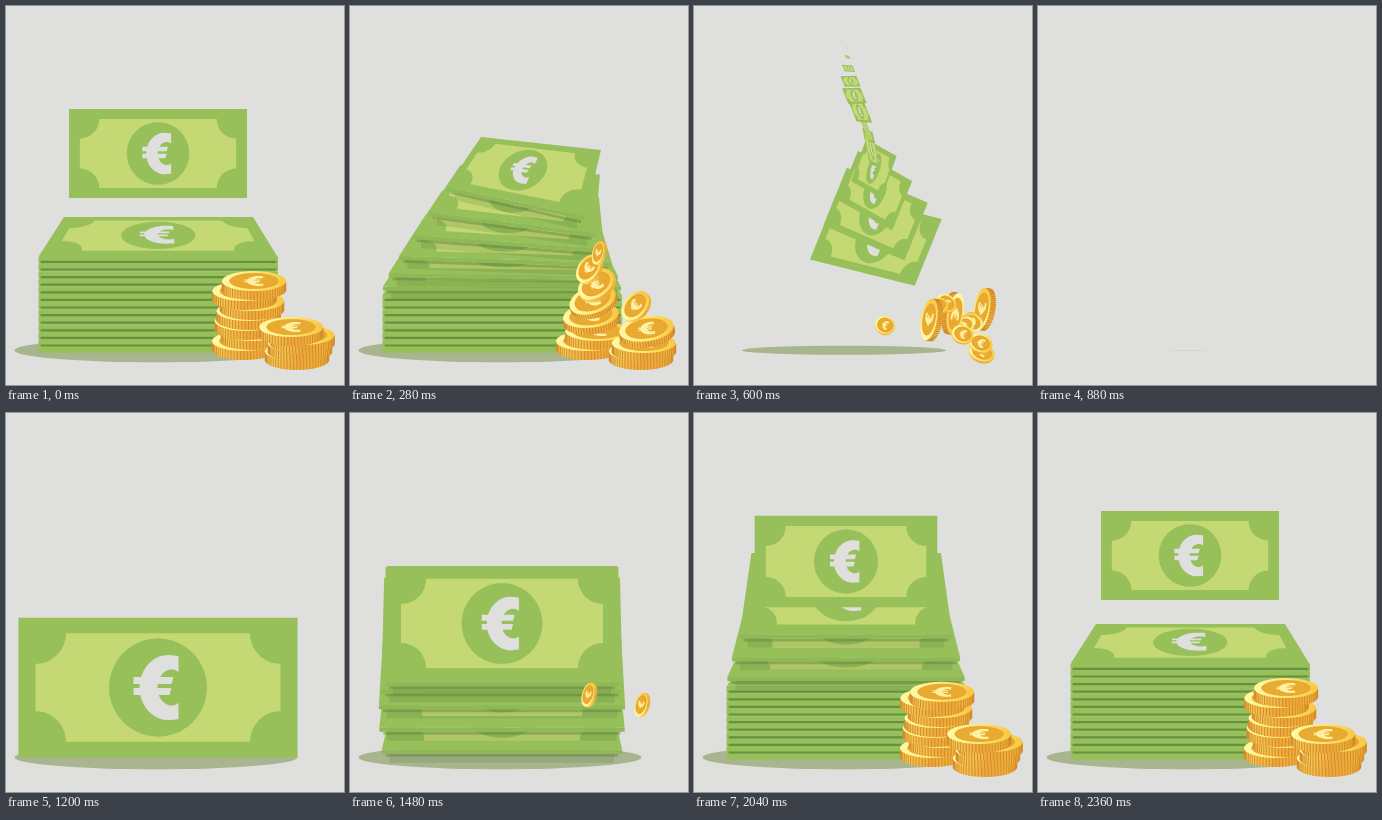
An HTML page that plays this animation: 338 by 379 pixels, repeating every 2.44 s.

```html
<!DOCTYPE html>
<html lang="en">
<head>
<meta charset="utf-8">
<title>Money pile</title>
<style>
html, body { margin: 0; width: 100%; height: 100%; overflow: hidden; background: #dfdfdd; }
svg { display: block; width: 338px; height: 379px; }
</style>
</head>
<body>
<svg viewBox="0 0 338 379" width="338" height="379">
  <defs>
    <linearGradient id="rim"><stop offset="0" stop-color="#fff9a6"/><stop offset=".5" stop-color="#ffe970"/><stop offset="1" stop-color="#f8c740"/></linearGradient>
    <linearGradient id="side"><stop offset="0" stop-color="#fbd75c"/><stop offset=".5" stop-color="#eda93a"/><stop offset="1" stop-color="#f3b63c"/></linearGradient>
  </defs>
  <g id="stage"></g>
</svg>
<script>
const LOOP = 2440, STEP = 40, LAYERS = 13, GAP = 7.6;
const BG = '#dfdfdd', GREEN = '#97c05b', LIGHT = '#c4d973';
const { PI, sin, cos, tanh, exp, abs } = Math;
const stage = document.getElementById('stage');

const clamp = v => Math.max(0, Math.min(1, v));
const span = (t, a, b) => clamp((t - a) / (b - a));
const smooth = v => v * v * (3 - 2 * v);
const rad = deg => deg * PI / 180;
const mix = (a, b, p) => a + (b - a) * p;
const mixAll = (a, b, p) => a.map((v, i) => Array.isArray(v) ? mixAll(v, b[i], p) : mix(v, b[i], p));
const path = pts => 'M' + pts.map(p => p[0].toFixed(2) + ' ' + p[1].toFixed(2)).join('L') + 'Z';
const fill = (d, color, extra = '') => `<path d="${d}" fill="${color}" ${extra}/>`;

// Points on an ellipse between two angles in degrees
function arc(cx, cy, rx, ry, from, to, n = 20) {
  return Array.from({ length: n + 1 }, (_, i) => {
    const a = rad(mix(from, to, i / n));
    return [cx + rx * cos(a), cy + ry * sin(a)];
  });
}

// Banknote artwork on a 279 x 139 sheet
const W = 279, H = 139, MX = 17, MY = 15.5, R = 30.5;
const inner = [
  ...arc(MX, MY, R, R, 90, 0, 10),
  ...arc(W - MX, MY, R, R, 180, 90, 10),
  ...arc(W - MX, H - MY, R, R, 270, 180, 10),
  ...arc(MX, H - MY, R, R, 0, -90, 10)
];
const disc = arc(139.5, 69.5, 49, 49, 0, 360, 40);
const bar = (y, right) => [[115, y], [115, y + 7], [right - 2, y + 7], [right, y]];
const euro = [
  [[160, 38], ...arc(150, 69.5, 29, 32.5, -80, -280), [160, 101],
   [160, 85], ...arc(153, 69.5, 14, 18, 75, 285), [160, 54]],
  bar(59, 155), bar(70, 153)
];
const coinEuro = euro.map(s => path(s.map(([x, y]) => [(x - 138) / 65, (y - 69.5) / 65]))).join('');

// Perspective map of the sheet onto corners TL, TR, BR, BL
function project([[x0, y0], [x1, y1], [x2, y2], [x3, y3]]) {
  const ax = x1 - x2, ay = y1 - y2, bx = x3 - x2, by = y3 - y2;
  const sx = x0 - x1 + x2 - x3, sy = y0 - y1 + y2 - y3;
  const den = ax * by - bx * ay || 1e-6;
  const g = (sx * by - bx * sy) / den, h = (ax * sy - sx * ay) / den;
  return ([px, py]) => {
    const u = px / W, v = py / H, w = g * u + h * v + 1;
    return [((x1 - x0 + g * x1) * u + (x3 - x0 + h * x3) * v + x0) / w,
            ((y1 - y0 + g * y1) * u + (y3 - y0 + h * y3) * v + y0) / w];
  };
}

// Paper edge plus the soft shade it casts below
function edge([, , [rx, ry], [lx, ly]], thick) {
  const strip = (top, low, inset) => path([
    [lx + inset, ly + top], [rx - inset, ry + top], [rx - inset, ry + low], [lx + inset, ly + low]
  ]);
  return fill(strip(thick, thick + 3, 4), '#577a35', 'opacity=".4"') +
    fill(strip(thick, thick + 9, 8), '#577a35', 'opacity=".2"') +
    fill(strip(0, thick, 0), '#8fb857');
}

function bill(q, thick = 0) {
  const map = project(q), draw = pts => path(pts.map(map));
  return (thick ? edge(q, thick) : '') + fill(path(q), GREEN) + fill(draw(inner), LIGHT) +
    fill(draw(disc), GREEN) + fill(euro.map(draw).join(''), BG);
}

const rect = (cx, cy, w) => {
  const x = w / 2, y = w / 4;
  return [[cx - x, cy - y], [cx + x, cy - y], [cx + x, cy + y], [cx - x, cy + y]];
};
const drop = k => GAP * (LAYERS - 1 - k);
const shift = (q, dy) => q.map(([x, y]) => [x, y + dy]);
const FLAT = [[58, 211], [247, 211], [271, 250], [33, 250]];
const LIFTED = [[131, 138.6], [251, 151.6], [235, 218], [97, 188.6]];

// Bill at step j of the whirl: it shrinks, turns edge-on and drifts to the tip
function whirlQuad(j, k) {
  const hh = 36 * Math.pow(clamp(1 - j / 11.7), 1.6);
  const hw = 1.5 * hh * abs(cos(j * PI / 9.2));
  const a = rad(14 + 16 * sin(j * PI / 5)), b = rad(22 * tanh(2 * (j - 3.7)));
  const x = 153 + 29 / (1 + exp(.9 * (j - 5.8)));
  const y = 142 - 9.1 * j + drop(k) * clamp(1 - j / 10);
  return [[-1, -1], [1, -1], [1, 1], [-1, 1]].map(([m, n]) => [
    x + m * hw * cos(a) + n * hh * sin(b),
    y + m * hw * sin(a) + n * hh * cos(b)
  ]);
}

function risingQuad(s, k) {
  if (s <= 5) return shift(mixAll(FLAT, LIFTED, Math.pow(s / 5, 1.5)), drop(k));
  return mixAll(shift(LIFTED, drop(k)), whirlQuad(Math.max(0, s - 6), k), clamp(s - 5));
}

// Leading bill: [centre y, width]
function lead(t) {
  if (t < 1160) {
    const e = Math.pow(span(t, 940, 1160), 1.6);
    return [mix(42, 274.5, e), 279 * e];
  }
  const extra = 101 * Math.pow(1 - span(t, 1200, 2360), 2.4);
  return [142.5 + 1.307 * extra, 178 + extra];
}

// A bill keeps its width from release, then tips back onto the pile
function fallingQuad(k, u, t, release) {
  const from = rect(152, lead(t)[0], lead(release)[1]), to = shift(FLAT, drop(k));
  const top = Math.pow(u, 1.7), low = Math.pow(smooth(u), 1.3);
  return from.map((p, i) => mixAll(p, to[i], i < 2 ? top : low));
}

function pile(n) {
  let out = '';
  for (let k = 0; k < n; k++) {
    const y = 250 + drop(k);
    out += `<rect x="32.5" y="${y}" width="239.5" height="${k ? GAP + .3 : 5.5}" rx="1.5" fill="${GREEN}"/>`;
    if (k) out += `<rect x="34.5" y="${y + 4.8}" width="236" height="2.2" rx="1" fill="#66913f"/>`;
  }
  return n ? out + bill(shift(FLAT, drop(n - 1))) : '';
}

function leaving(t) {
  let out = '', settled = 0;
  for (let k = 0; k <= LAYERS; k++) {
    const s = 6 + k + (t - 600) / 22.86;
    if (k === LAYERS && t < 280) out += bill(mixAll(rect(152, 147.5, 178), shift(LIFTED, -GAP), smooth(t / 280)));
    else if (s <= 0) settled++;
    else if (s < 17.5) out += bill(risingQuad(s, k), s < 6 ? 4 : 0);
  }
  return pile(settled) + out;
}

function arriving(t) {
  let out = '', settled = 0;
  for (let k = 0; k < LAYERS; k++) {
    const release = 1240 + 54 * k, u = (t - release) / 280;
    if (u >= 1) settled++;
    else if (u > 0) out += bill(fallingQuad(k, u, t, release), 4);
  }
  const [y, w] = lead(t);
  return pile(settled) + out + (w > 0 ? bill(rect(152, y, w)) : '');
}

function shadow(t) {
  const size = t < 990 ? 1 - span(t, 450, 990) : span(t, 990, 1110);
  return `<ellipse cx="150" cy="344.3" rx="${141.5 * size}" ry="${12 * size ** 3}" fill="#a9b58f"/>`;
}

function coin([x, y, rx, ry, turn]) {
  if (rx < .4) return '';
  const th = rx * .3 * clamp(1.25 - ry / rx);
  let ribs = '';
  for (let a = 6; a < 180; a += 6) {
    ribs += `M${(cos(rad(a)) * rx).toFixed(1)} ${(sin(rad(a)) * ry).toFixed(1)}v${th.toFixed(1)}`;
  }
  const oval = (k, color, extra = '') => `<ellipse rx="${rx * k}" ry="${ry * k}" fill="${color}" ${extra}/>`;
  return `<g transform="translate(${x} ${y}) rotate(${turn})">` +
    fill(`M${-rx} 0v${th}A${rx} ${ry} 0 0 0 ${rx} ${th}V0Z`, 'url(#side)') +
    (rx > 20 ? `<path d="${ribs}" stroke="#cf862b" stroke-width=".9" fill="none"/>` : '') +
    oval(1, 'url(#rim)') + oval(.76, '#e9aa32', 'stroke="#dc982c" stroke-width=".6"') +
    fill(coinEuro, '#fff0a0', `transform="scale(${rx * .85} ${ry})"`) + '</g>';
}

// Two stacks; rank sets how early a coin leaves, scatter is its place in mid-air
const coins = [
  ...Array.from({ length: 7 }, (_, i) => {
    const n = 6 - i;
    return {
      i, rank: i, x: 243 + 5 * cos(2.6 * i + 3.1), y: 335 - 10 * i,
      scatter: [235 + 8.8 * n, 308 - 12 * cos(1.2 * (n - 1.7)), 14 + 7 * cos(n * PI / 1.5), 8, 60 * n - 80]
    };
  }),
  ...Array.from({ length: 4 }, (_, i) => ({
    i, rank: .53 * i * i, x: 291 + 6 * sin(i * i / 2), y: 345 - 8 * i,
    scatter: [288 - 97 * (i / 3) ** 4, 346 - 9 * i, 13 - i, 9, 20]
  }))
];

// away: 0 is lying in the stack, 1 is a thin sliver above it
function tilted(c, away, dy) {
  const q = 1 - away;
  return [c.x, c.y + dy, 8 + 24 * q, 10 * q + 8 * sin(PI * q), -100 * Math.pow(away, 1.5)];
}

function coinPose(c, t) {
  if (t < 900) {
    const away = clamp((c.rank - 1) / 6 + (Math.min(t, 280) - 280) / 264);
    const pose = mixAll(tilted(c, away, -34 * away), c.scatter, span(t, 280, 600));
    return mixAll(pose, [175, 140, 0, 0, 180], span(t, 600, 840));
  }
  const beat = (t - 1673) / 47 - c.i;
  if (beat <= -5) return null;
  return tilted(c, clamp(-beat / 5), 13 * (beat < 0 ? beat : sin(PI * Math.min(beat, 2) / 2)));
}

const start = performance.now();
function frame() {
  const now = Math.max(0, performance.now() - start) % LOOP;
  const t = Math.min(2360, Math.floor(now / STEP) * STEP);
  const money = coins.map(c => coinPose(c, t)).filter(Boolean).map(coin).join('');
  stage.innerHTML = shadow(t) + (t < 940 ? leaving(t) : arriving(t)) + money;
  requestAnimationFrame(frame);
}
frame();
</script>
</body>
</html>
```
